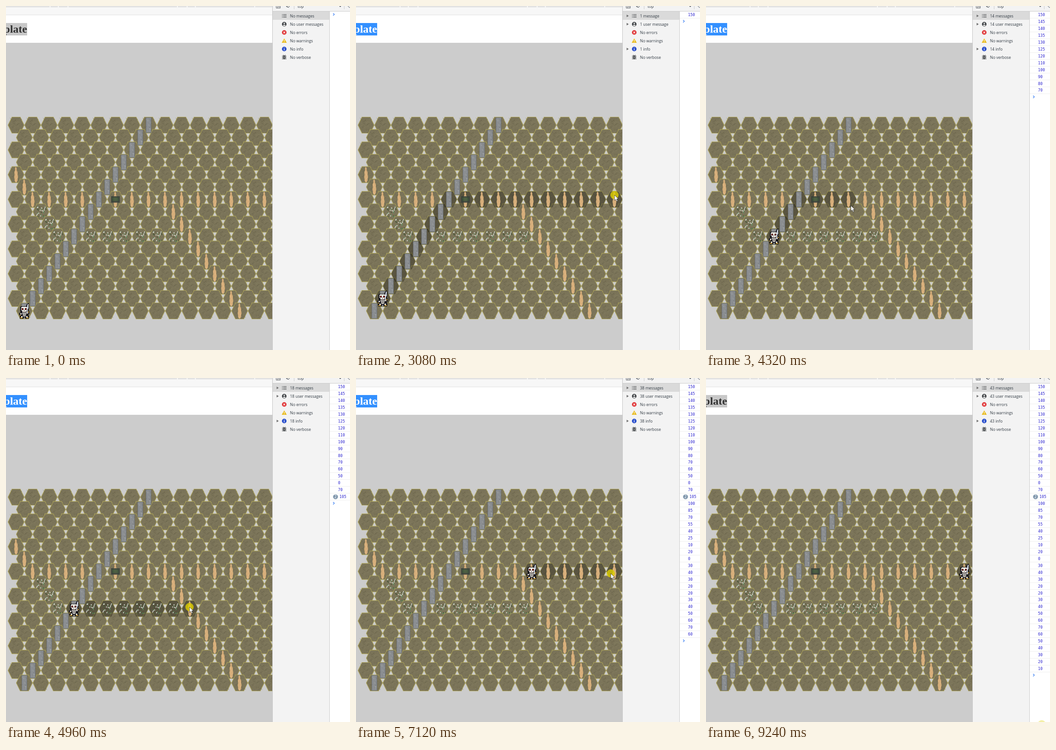
These frames come from a looping animation (748 px wide and 748 px high, 9.4 s). An HTML page:

```html
<!DOCTYPE html>
<html lang="en">
<head>
<meta charset="utf-8">
<title>Hex path finding</title>
<style>
  html, body { margin: 0; width: 100%; height: 100%; overflow: hidden; background: #fff; }
  svg { display: block; width: 748px; height: 748px; }
  .title { font: bold 24px "Liberation Serif", serif; }
  .side { font: 8.5px "Open Sans", sans-serif; fill: #303942; }
  .log { font: 8.25px "DejaVu Sans Mono", monospace; fill: #2a22cf; }
</style>
</head>
<body>
<svg id="stage" viewBox="0 0 748 748" xmlns="http://www.w3.org/2000/svg"></svg>
<script>
const LOOP = 9400;
const HEX = "-17.5,0 -9,-17.5 9,-17.5 17.5,0 9,17.5 -9,17.5";
const COST = { wall: 5, trail: 10, bush: 15 };

const range = (n, make) => Array.from({ length: n }, (_, i) => make(i));
const rowY = row => +(259 + 26.93 * row).toFixed(1);
const cell = (x, row, kind) => ({ x, y: rowY(row), kind });
const rect = (x, y, w, h, fill, extra = "") =>
  `<rect x="${x}" y="${y}" width="${w}" height="${h}" fill="${fill}" ${extra}/>`;
const place = (id, c) => `<use href="#${id}" x="${c.x}" y="${c.y}"/>`;

let seed = 7;
const random = (lo, hi) => {
  seed = seed * 16807 % 2147483647;
  return +(lo + (hi - lo) * seed / 2147483647).toFixed(1);
};

// Map
const walls = range(16, i => cell(40 + 18 * i, 15 - i, "wall"));
const road = range(15, i => cell(58 + 36 * i, 6, "trail")).filter(c => c.x !== 202);
const slope = range(9, i => cell(364 + 18 * i, 7 + i, "trail"));
const bushes = [
  cell(76, 7, "bush"), cell(94, 8, "bush"), cell(112, 9, "bush"),
  ...range(6, i => cell(184 + 36 * i, 9, "bush"))
];
const features = [cell(22, 4, "trail"), cell(40, 5, "trail"), ...road, ...slope, ...walls, ...bushes];

// Routes
const main = [...walls.slice(0, 10), ...road.slice(4)];
const hook = [...main.slice(6, 14), slope[0]];
const low = [walls[6], ...bushes.slice(3), slope[2]];
const side = [...low.slice(0, 7), slope[1]];
const up = [slope[2], slope[1], slope[0], ...main.slice(14)];
const left = [...up.slice(0, 3), main[13]];

// time, route, hero index, target index, repeats the previous log line
const states = [
  [0, main, 0, -1],
  [1560, main, 0, 19],
  ...range(6, i => [3080 + 160 * i, main, 1 + i, 19]),
  [3900, main, 6, 18],
  ...range(5, i => [4150 + 30 * i, main, 6, 17 - i]),
  [4275, main, 6, 12],
  [4430, main, 6, 5],
  [4510, hook, 0, 8],
  [4590, side, 0, 7],
  [4700, low, 0, 7, true],
  ...range(7, i => [5000 + 150 * i, low, 1 + i, 7]),
  [5930, up, 0, 1], [5950, up, 0, -1], [5970, up, 0, 2],
  [6080, left, 0, 3], [6280, left, 1, 3], [6440, left, 2, 3],
  ...range(6, i => [6510 + 45 * i, up, 2, 3 + i]),
  ...range(6, i => [7050 + 160 * i, up, 3 + i, 8])
].map(([time, route, from, to, repeat]) => {
  const path = route.slice(from, to + 1);
  return { time, path, hero: route[from], repeat, cost: path.reduce((sum, c) => sum + COST[c.kind], 0) };
});

const cursorKeys = [
  [240, 45, 724], [400, 88, 725], [480, 88, 725], [560, 130, 732], [1000, 732, 733],
  [1250, 700, 520], [1480, 600, 410], [1560, 572, 410], [1680, 562, 411], [3900, 562, 411],
  [3960, 540, 412], [4100, 540, 412], [4320, 315, 434], [4420, 315, 434], [4800, 399, 498],
  [5860, 399, 498], [5960, 382, 468], [6040, 373, 441], [6160, 346, 424], [6300, 346, 424],
  [6500, 375, 424], [6800, 554, 425], [7700, 554, 425], [8680, 676, 648], [9240, 730, 753], [9400, 730, 753]
];
const clicks = [[3080, .8], [4940, .8], [6240, .8], [7060, .8], [9200, .35]];

function strokes(n, w, h, len) {
  return range(n, () => `M${random(-w, w)} ${random(-h, h)}l${random(-len, len)} ${random(-len, len)}`).join("");
}

function dots(n, fill, r) {
  return range(n, () => `<ellipse cx="${random(-9, 12)}" cy="${random(-11, 11)}" rx="${r}" ry="${r * 1.3}" fill="${fill}"/>`).join("");
}

function defs() {
  return `<defs>
    <clipPath id="page"><path d="M0 0H579V748H0z"/></clipPath>
    <g id="hex"><polygon points="${HEX}" fill="#7b7459" stroke="#aaa158" stroke-width="1.2"/>
      <path d="${strokes(32, 11, 14, 5)}" stroke="#918b6b" stroke-width=".7" opacity=".55"/>
      <path d="${strokes(32, 11, 14, 5)}" stroke="#625c45" stroke-width=".7" opacity=".6"/></g>
    <polygon id="shade" points="${HEX}" fill="#000" opacity=".28"/>
    <g id="wall">${rect(-5.5, -16.5, 11, 33, "#8b8e91", 'stroke="#6c7074"')}
      <path d="${strokes(16, 4, 14, 3)}" stroke="#a3a6a9" stroke-width=".8"/>
      <path d="${strokes(12, 4, 14, 3)}" stroke="#74787c" stroke-width=".8"/></g>
    <g id="trail"><path d="M-1-17Q2-14 1-10Q4-5 3 0Q5 5 3 9Q4 14 0 17Q-4 15-3 10Q-5 5-3 0Q-5-5-2-10Q-3-14-1-17z"
      fill="#dfb783" stroke="#b99563" stroke-width=".6"/>
      <path d="M0-12Q1-4-1 1T1 13M2 2L1 7" fill="none" stroke="#c99f6c" stroke-width="1"/></g>
    <g id="bush">${dots(11, "#4c5a3e", 1.1)}${dots(9, "#5d9465", .9)}${dots(13, "#dfe0d8", 1)}</g>
    <g id="sign" opacity=".9">${rect(-9.5, -7, 19, 14, "#38413b")}${rect(-7, -4.5, 14, 8, "#3b5039")}
      <path d="M-6-2H5M-5 1H6" stroke="#4c6a49" stroke-width="1.2" stroke-dasharray="2 1"/></g>
    <g id="hero" shape-rendering="crispEdges">
      <path d="M-8-10H4V-13H5V-15H7V-17H10V-4H9V0H11V6H9V12H10V17H2V14H-2V17H-10V10H-11V4H-8V2H-9V-9H-8z" fill="#111018"/>
      <path d="M-6-9H4V-8H6V-1H4V3H-5V-1H-7V-8H-6z" fill="#f5f2e9"/>
      <path d="M7-15H9V-5H7V5H5V-9H6V-13H7z" fill="#e9ecf2"/>
      <path d="M7-14H8V-4H7z" fill="#8f9cb0"/>
      <path d="M-6-6H-2V-2H-6zM1-6H5V-2H1z" fill="#251012"/>
      <path d="M-5-5H-3V-3H-5zM2-5H4V-3H2z" fill="#c92d28"/>
      <path d="M-1-2H0V0H-1zM-4 1H-3V3H-4zM-1 1H0V3H-1zM2 1H3V3H2z" fill="#251012"/>
      <path d="M-9 5H-6V8H-9zM-5 4H5V6H-5zM-4 7H4V9H-4zM-3 10H3V12H-3zM-7 11H-4V14H-7zM4 11H7V14H4zM6 4H8V6H6z" fill="#e5e1d8"/>
      <path d="M-9 14H-4V16H-9zM4 14H9V16H4zM8 1H10V4H8zM-10 9H-8V11H-10z" fill="#d6a63c"/>
    </g>
  </defs>`;
}

function pageTop() {
  const ticks = [95, 113, 134, 372, 393, 411, 540].map(x => rect(x, 0, 1.5, 3, "#fff")).join("");
  return rect(0, 0, 579, 748, "#fff") + rect(0, 0, 579, 3, "#e3e3e3") + ticks +
    rect(0, 3, 579, 17, "#f7f7f7") + rect(0, 19, 579, 1, "#e1e1e1") + rect(0, 80, 579, 668, "#ccc");
}

function board() {
  const tiles = range(16, row => range(16, col => place("hex", cell(22 + 36 * col + row % 2 * 18, row))).join(""));
  return `<g clip-path="url(#page)">${tiles.join("")}<g id="path"></g>
    ${features.map(c => place(c.kind, c)).join("")}${place("sign", cell(238, 6))}<use id="player" href="#hero"/></g>`;
}

function sideIcons() {
  const line = 'fill="none" stroke="#45484b"';
  return `<g transform="translate(605 0)">
    <path d="M-5 18.5h1.5M-5 21.5h1.5M-5 24.5h1.5M-2.5 18.5H5M-2.5 21.5H5M-2.5 24.5H5" ${line} stroke-width="1.2"/>
    <circle cy="39.5" r="5" fill="#45484b"/><circle cy="37.8" r="1.6" fill="#f3f3f3"/>
    <path d="M-3 42.2Q0 39 3 42.2Q0 44.8-3 42.2z" fill="#f3f3f3"/>
    <circle cy="57.5" r="5" fill="#e0383a"/><path d="M-1.8 55.7L1.8 59.3M1.8 55.7L-1.8 59.3" stroke="#fff" stroke-width="1.2"/>
    <path d="M0 70.5L5.5 80H-5.5z" fill="#e8bb1d"/><path d="M0 73.7V76.7M0 77.6V78.8" stroke="#fff" stroke-width="1.2"/>
    <circle cy="93.5" r="5" fill="#2b50cc"/><path d="M0 90.5V91.8M0 92.7V96.5" stroke="#fff" stroke-width="1.3"/>
    <ellipse cy="111.8" rx="2.8" ry="4" fill="#45484b"/>
    <path d="M-5 109H5M-5 112H5M-5 115H5M-2.5 106.3L-1 108M2.5 106.3L1 108" ${line} stroke-width="1.2"/>
    <path d="M-1.2 110.7H1.2M-1.2 113H1.2" stroke="#f3f3f3" stroke-width=".8"/></g>`;
}

function devtools() {
  return rect(579, 0, 169, 748, "#f3f3f3") + rect(704, 12, 44, 736, "#fff") +
    rect(579, 0, 1, 748, "#c4c4c4") + rect(580, 11, 168, 1, "#ccc") + rect(703, 12, 1, 736, "#ccc") +
    rect(580, 12, 123, 18, "#dadada") +
    `<g fill="none" stroke="#5f6368"><path d="M587.5 0V4.5H596.5V0M590.5 0V4.5M595 0L592.5 1.5L595 3"/>
      <path d="M609.2 0A4 4 0 0 0 616.8 0M610 0L615 3.5"/><path d="M626.5 0V7M735.5 0V7" stroke="#ccc"/>
      <path d="M743.5 0Q745 3 748 3.5"/></g>
    <path d="M724.5 0H729L726.7 2.5z" fill="#5f6368"/><text class="side" x="634" y="4">top</text>` +
    sideIcons() + `<g id="labels" class="side"></g><g id="console"></g>`;
}

const stage = document.getElementById("stage");
stage.innerHTML = defs() + pageTop() +
  `<rect id="mark" y="37" width="46" height="27"/><text id="title" class="title" x="46" y="58" text-anchor="end">plate</text>` +
  board() + devtools() +
  `<circle id="halo" r="9" fill="#ded000"/>
   <path id="cursor" d="M0 0V12L2.8 9.4L4.8 14L6.9 13.1L4.9 8.6H8.6z" fill="#fff" stroke="#222" stroke-width=".7"/>`;
const part = Object.fromEntries(["path", "player", "mark", "title", "labels", "console", "halo", "cursor"]
  .map(id => [id, document.getElementById(id)]));

function labels(n) {
  const count = noun => n ? `${n} ${noun}${n > 1 ? "s" : ""}` : `No ${noun}s`;
  const names = [count("message"), count("user message"), "No errors", "No warnings", `${n || "No"} info`, "No verbose"];
  return names.map((name, i) => {
    const y = 21.5 + 18 * i;
    const arrow = n && [0, 1, 4].includes(i) ? `<path d="M588.5 ${y - 2.7}L593 ${y}L588.5 ${y + 2.7}z" fill="#6e6e6e"/>` : "";
    return `${arrow}<text x="617.5" y="${y + 3}">${name}</text>`;
  }).join("");
}

function consoleRows(logged) {
  const rows = [];
  for (const s of logged) {
    if (s.repeat) rows[rows.length - 1].times = 2;
    else rows.push({ value: s.cost, times: 1 });
  }
  const lines = rows.map(({ value, times }, i) => {
    const y = 19 + 14.95 * i;
    const badge = times > 1
      ? `<circle cx="716.5" cy="${y}" r="5.3" fill="#8097ad"/><text class="log" x="714" y="${y + 3}" style="fill:#fff">2</text>` : "";
    return `${rect(704, (y + 7).toFixed(1), 44, .8, "#ececec")}${badge}
      <text class="log" x="${times > 1 ? 725 : 722}" y="${(y + 3).toFixed(1)}">${value}</text>`;
  });
  const y = 18.2 + 14.95 * rows.length;
  return lines.join("") + `<path d="M711.3 ${y - 2.6}L714 ${y}L711.3 ${y + 2.6}" fill="none" stroke="#367cf1" stroke-width="1.2"/>`;
}

function cursorAt(t) {
  const i = cursorKeys.findIndex(k => k[0] > t);
  const [t0, x0, y0] = cursorKeys[i - 1], [t1, x1, y1] = cursorKeys[i];
  const f = (t - t0) / (t1 - t0);
  return `translate(${x0 + (x1 - x0) * f} ${y0 + (y1 - y0) * f})`;
}

const drawn = {};
function redraw(name, key, make) {
  if (drawn[name] === key) return;
  drawn[name] = key;
  part[name].innerHTML = make();
}

function render(t) {
  const until = time => states.filter(s => s.time <= time);
  const now = until(t).pop();
  redraw("path", now.time, () => now.path.map(c => place("shade", c)).join(""));
  part.player.setAttribute("x", now.hero.x);
  part.player.setAttribute("y", now.hero.y);

  // The counters and then the rows trail slightly behind each move.
  const count = until(Math.max(0, t - 40)).length - 1;
  const logged = until(Math.max(0, t - 60)).slice(1);
  redraw("labels", count, () => labels(count));
  redraw("console", logged.length, () => consoleRows(logged));

  const focused = t >= 3080 && t < 8680;
  part.mark.setAttribute("fill", focused ? "#3390ff" : "#c8c8c8");
  part.title.setAttribute("fill", focused ? "#fff" : "#323232");

  const shown = t >= 240;
  const click = clicks.find(([start]) => t >= start && t < start + 200);
  part.cursor.setAttribute("visibility", shown ? "visible" : "hidden");
  part.halo.setAttribute("opacity", click ? click[1] : 0);
  if (shown) for (const name of ["cursor", "halo"]) part[name].setAttribute("transform", cursorAt(t));
}

const start = performance.now();
function tick() {
  render((performance.now() - start) % LOOP);
  requestAnimationFrame(tick);
}
tick();
</script>
</body>
</html>
```
